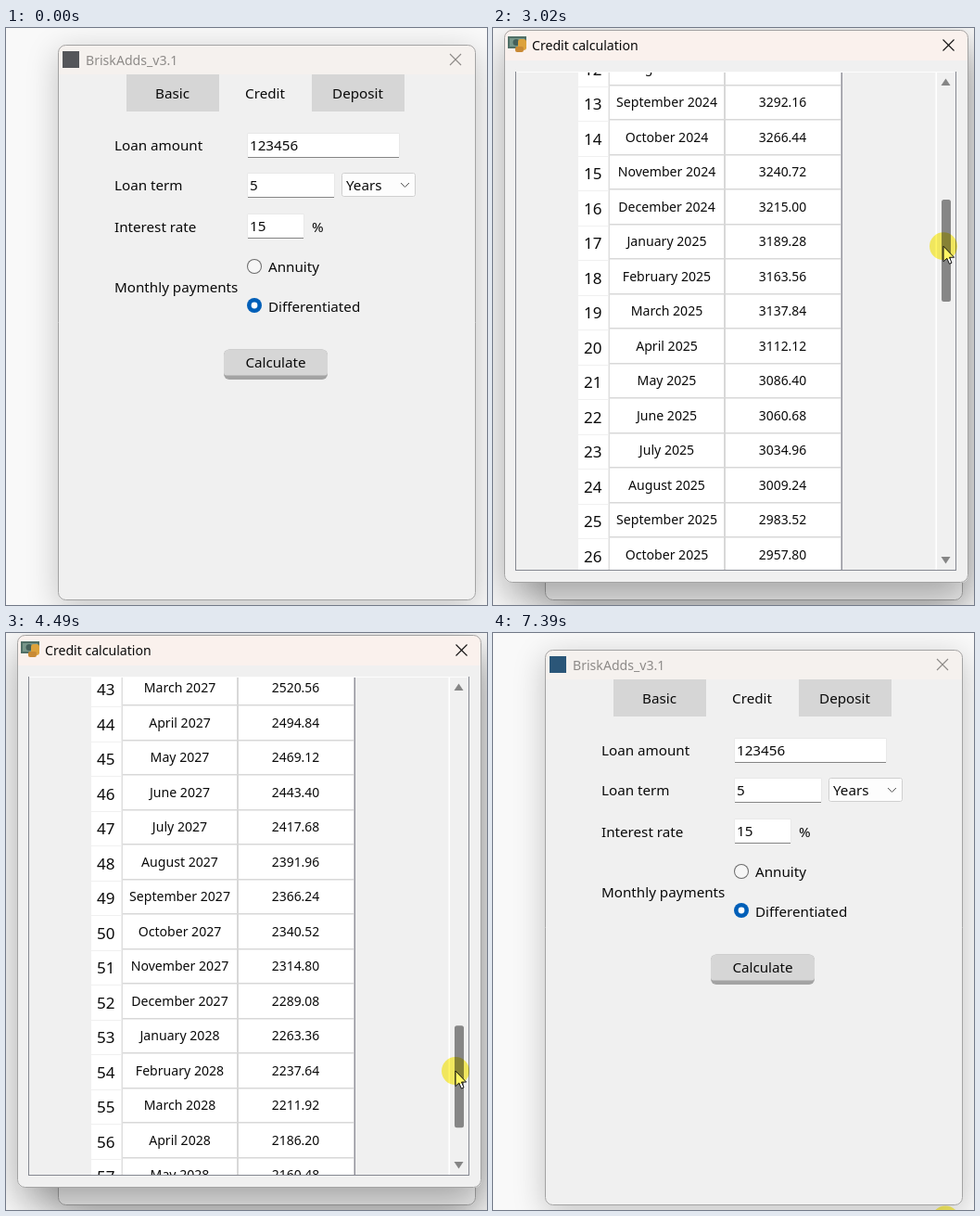
Write an HTML page with a canvas that moves like this. It is 519 px wide and 622 px high and loops after 7450 ms.

```html
<!DOCTYPE html>
<html lang="en">
<head>
<meta charset="utf-8">
<title>Loan calculator</title>
<style>
html, body { margin: 0; width: 100%; height: 100%; overflow: hidden; background: #f9f9f9; }
canvas { display: block; }
</style>
</head>
<body>
<canvas id="stage" width="519" height="622"></canvas>
<script>
const ctx = document.getElementById('stage').getContext('2d');
const LOOP = 7450;
const ROW = 37.5, ROWS = 60, MAX_SCROLL = 1853;
const THUMB_TOP = 68, THUMB_TRAVEL = 385, THUMB_H = 110;
const MONTHS = ['January', 'February', 'March', 'April', 'May', 'June', 'July',
  'August', 'September', 'October', 'November', 'December'];

// Pointer path: time, x, y
const POINTER = [
  [320, 335, 640], [620, 318, 470], [900, 292, 360], [1520, 292, 360],
  [1780, 400, 235], [1960, 480, 140], [2200, 503, 118], [2280, 503, 118],
  [2670, 492, 172], [3020, 486, 235], [3450, 489, 345], [3860, 491, 438],
  [4210, 490, 463], [4490, 485, 472], [4900, 485, 503], [5100, 484, 503],
  [5420, 470, 390], [5750, 478, 232], [6150, 502, 20], [6660, 502, 20],
  [6860, 496, 250], [7120, 489, 630], [7450, 488, 633]
];
// Scrollbar thumb: time, top edge
const THUMB = [
  [2280, 68], [2670, 122], [3020, 184.8], [3450, 295],
  [3860, 387.8], [4210, 412], [4490, 423.1], [4900, 453]
];
const PRESSES = [[960, 1110], [2250, 5060], [6540, 6650], [7320, 7450]];

const clamp = v => Math.max(0, Math.min(1, v));
const ramp = (t, a, b) => clamp((t - a) / (b - a));
const between = (t, a, b) => t >= a && t < b;

function follow(path, t) {
  let i = 1;
  while (i < path.length - 1 && path[i][0] < t) i++;
  const [ta, ...from] = path[i - 1], [tb, ...to] = path[i];
  const p = ramp(t, ta, tb);
  return from.map((v, k) => v + (to[k] - v) * p);
}

function rect(x, y, w, h, color) {
  ctx.fillStyle = color;
  ctx.fillRect(x, y, w, h);
}

function roundRect(x, y, w, h, r, color) {
  ctx.beginPath();
  ctx.roundRect(x, y, w, h, r);
  ctx.fillStyle = color;
  ctx.fill();
}

function outline(x, y, w, h, r, color) {
  ctx.beginPath();
  ctx.roundRect(x + .5, y + .5, w - 1, h - 1, r);
  ctx.strokeStyle = color;
  ctx.lineWidth = 1;
  ctx.stroke();
}

function line(points, color, width = 1) {
  ctx.beginPath();
  points.forEach(([x, y]) => ctx.lineTo(x, y));
  ctx.strokeStyle = color;
  ctx.lineWidth = width;
  ctx.stroke();
}

function polygon(points, color) {
  ctx.beginPath();
  points.forEach(([x, y]) => ctx.lineTo(x, y));
  ctx.closePath();
  ctx.fillStyle = color;
  ctx.fill();
}

function disc(x, y, r, color) {
  ctx.beginPath();
  ctx.arc(x, y, r, 0, 7);
  ctx.fillStyle = color;
  ctx.fill();
}

function text(s, x, y, size = 15.2, color = '#0a0a0a', align = 'left') {
  ctx.font = size + 'px "Noto Sans", "Open Sans", sans-serif';
  ctx.textAlign = align;
  ctx.fillStyle = color;
  ctx.fillText(s, x, y);
}

const centered = (s, x, y, size) => text(s, x, y, size, '#0a0a0a', 'center');

function cross(x, y, color) {
  line([[x - 6, y - 6], [x + 6, y + 6]], color, 1.1);
  line([[x - 6, y + 6], [x + 6, y - 6]], color, 1.1);
}

function windowFrame(x, y, w, h, bar, barColor, blur, drop, alpha) {
  ctx.save();
  ctx.shadowColor = `rgba(0,0,0,${alpha})`;
  ctx.shadowBlur = blur;
  ctx.shadowOffsetY = drop;
  roundRect(x, y, w, h, 8, '#f0f0f0');
  ctx.restore();
  roundRect(x, y, w, bar, [8, 8, 0, 0], barColor);
  outline(x, y, w, h, 8, '#a3a3a3');
}

function field(x, y, w, value) {
  rect(x - .5, y - .5, w + 1, 26, '#e2e2e2');
  rect(x, y, w, 25, '#fff');
  rect(x, y + 25, w, 1, '#858585');
  text(value, x + 2, y + 18);
}

function drawForm(t) {
  const active = between(t, 970, 7320);
  const ink = active ? '#111' : '#8d8a88';
  windowFrame(56, 18, 451, 599, 32, '#f5f1ee', active ? 44 : 34, active ? 12 : 8, active ? .28 : .22);
  rect(61, 25, 18, 18, t < 70 ? '#54565a' : t < 140 ? '#3f5468' : '#2b5678');
  text('BriskAdds_v3.1', 86, 40, 14.1, ink);
  cross(485, 34, ink);

  rect(130, 50, 100, 40, '#d6d6d6');
  rect(330, 50, 100, 40, '#d6d6d6');
  ['Basic', 'Credit', 'Deposit'].forEach((s, i) => centered(s, 179.5 + i * 100, 76));

  text('Loan amount', 117, 132);
  text('Loan term', 117, 175);
  text('Interest rate', 117, 220);
  text('Monthly payments', 117, 285);
  field(261, 114, 163, '123456');
  field(261, 157, 93, '5');
  field(261, 201, 60, '15');
  text('%', 330, 220);

  roundRect(362, 156, 80, 26, 2, '#fdfdfd');
  outline(362, 156, 80, 26, 2, '#cfcfcf');
  text('Years', 367, 175);
  line([[426, 167], [430.5, 171.5], [435, 167]], '#555');

  disc(268, 257, 8, '#6a6a6a');
  disc(268, 257, 7, '#f6f6f6');
  disc(268, 299, 8, '#005fb8');
  disc(268, 299, 3.4, '#fff');
  text('Annuity', 283, 263);
  text('Differentiated', 283, 306);

  const pressed = between(t, 960, 1110);
  roundRect(235, 346.5, 112, 32.5, 6, '#a3a3a3');
  roundRect(235, 346.5, 112, 28, [6, 6, 3, 3], pressed ? '#c2c2c2' : '#d6d6d6');
  centered('Calculate', 291, 366);
}

function drawMoneyIcon() {
  rect(16, 9, 20, 13, '#4f6f66');
  rect(18, 11, 16, 9, '#78978a');
  disc(25, 15.5, 3.5, '#44605a');
  roundRect(27, 12, 9, 12, 3, '#dda23c');
  roundRect(24, 20, 9, 6, 2, '#c98a35');
}

function drawTable(scroll) {
  ctx.save();
  ctx.beginPath();
  ctx.rect(25, 48, 452, 536);
  ctx.clip();
  ctx.translate(0, -Math.round(scroll));

  text('Accrued interest', 91, 90, 17.7);
  text('Debt + interest', 91, 113, 17.7);
  text('3600.80', 235, 78, 17.7);
  text('....', 311, 78, 17.7);
  text('2083.32', 343.5, 78, 17.7);
  text('47067.60', 235, 101, 17.7);
  text('170523.60', 235, 124.5, 17.7);

  const top = 174.5, height = ROWS * ROW;
  rect(92, 137, 284, top + height - 137, '#fff');
  rect(125, 137, 1, 38, '#ececec');
  rect(249, 137, 1, 38, '#ececec');
  centered('Date', 187, 163, 17.2);
  centered('Payment', 312, 163, 17.2);
  rect(124.5, top, 1.5, height, '#dedede');
  rect(249, top, 2, height, '#d8d8d8');

  for (let n = 1; n <= ROWS; n++) {
    const y = 193 + (n - 1) * ROW;
    if (y < scroll || y > scroll + 640) continue;
    const month = n + 7;
    rect(92, Math.round(y + 20), 33, 1, '#f0f0f0');
    rect(126, Math.round(y + 18), 249, 1.5, '#d8d8d8');
    text(n, 98, Math.round(y + 8), 17);
    centered(`${MONTHS[month % 12]} ${2023 + Math.floor(month / 12)}`, 187.5, Math.round(y + 5), 14.1);
    centered((3600.8 - 25.72 * (n - 1)).toFixed(2), 312.5, Math.round(y + 5), 13.9);
  }
  rect(375.5, 137, 1.5, top + height - 137, '#92929a');
  rect(92, top + height, 285, 1.5, '#92929a');
  ctx.restore();
}

function drawScrollbar(t, thumbY) {
  rect(477.5, 48, 1.5, 536, '#fff');
  const hover = ramp(t, 1950, 2080) * (1 - ramp(t, 6150, 6470));
  const width = 6.5 + 3.5 * hover;
  roundRect(489 - width / 2, thumbY, width, THUMB_H, 2.5, '#868686');
  ctx.globalAlpha *= hover;
  polygon([[483.5, 62], [488.5, 54.5], [493.5, 62]], '#858585');
  polygon([[483.5, 570], [488.5, 577.5], [493.5, 570]], '#858585');
}

function drawDialog(t, x, y) {
  const opening = ramp(t, 1240, 1460);
  const closing = ramp(t, 6600, 6760);
  if (opening === 0 || closing === 1) return;
  const scale = (.88 + .12 * (1 - (1 - opening) ** 2)) * (1 - .1 * closing);
  const [thumbY] = follow(THUMB, t);

  ctx.save();
  ctx.globalAlpha = clamp(opening * 2) * (1 - closing);
  ctx.translate(262.5, 300 - (opening < 1 ? .8 : 0));
  ctx.scale(scale, scale);
  ctx.translate(-262.5, -300);

  windowFrame(12, 2, 501, 596, 33, '#faf1ed', 40, 16, .32);
  drawMoneyIcon();
  text('Credit calculation', 42, 24, 14.1);
  const hot = x > 472 && y < 33;
  if (hot) roundRect(472, 3, 41, 30, [0, 7, 0, 0], '#c42b1c');
  cross(491.5, 18.5, hot ? '#fff' : '#111');

  drawTable((thumbY - THUMB_TOP) / THUMB_TRAVEL * MAX_SCROLL);

  rect(24, 47, 476, 1, '#fcfcfc');
  rect(24, 47, 1, 538, '#858891');
  rect(499, 47, 1, 538, '#858891');
  rect(24, 584, 476, 1, '#858891');
  drawScrollbar(t, thumbY);
  ctx.restore();
}

function drawPointer(x, y, pressed) {
  const shape = [[0, 0], [0, 16.5], [3.8, 13], [6.4, 19], [9, 17.9], [6.5, 12], [11.6, 12]]
    .map(([dx, dy]) => [x + dx, y + dy]);
  polygon(shape, '#fff');
  line([...shape, shape[0]], '#111');
  if (!pressed) return;
  ctx.globalCompositeOperation = 'multiply';
  disc(x, y, 15, '#fff564');
  ctx.globalCompositeOperation = 'source-over';
}

function draw(t) {
  const [x, y] = follow(POINTER, t);
  rect(0, 0, 519, 622, '#f9f9f9');
  drawForm(t);
  drawDialog(t, x, y);
  if (t >= 320) drawPointer(x, y, PRESSES.some(([a, b]) => between(t, a, b)));
}

function tick() {
  draw(performance.now() % LOOP);
  requestAnimationFrame(tick);
}
tick();
</script>
</body>
</html>
```
